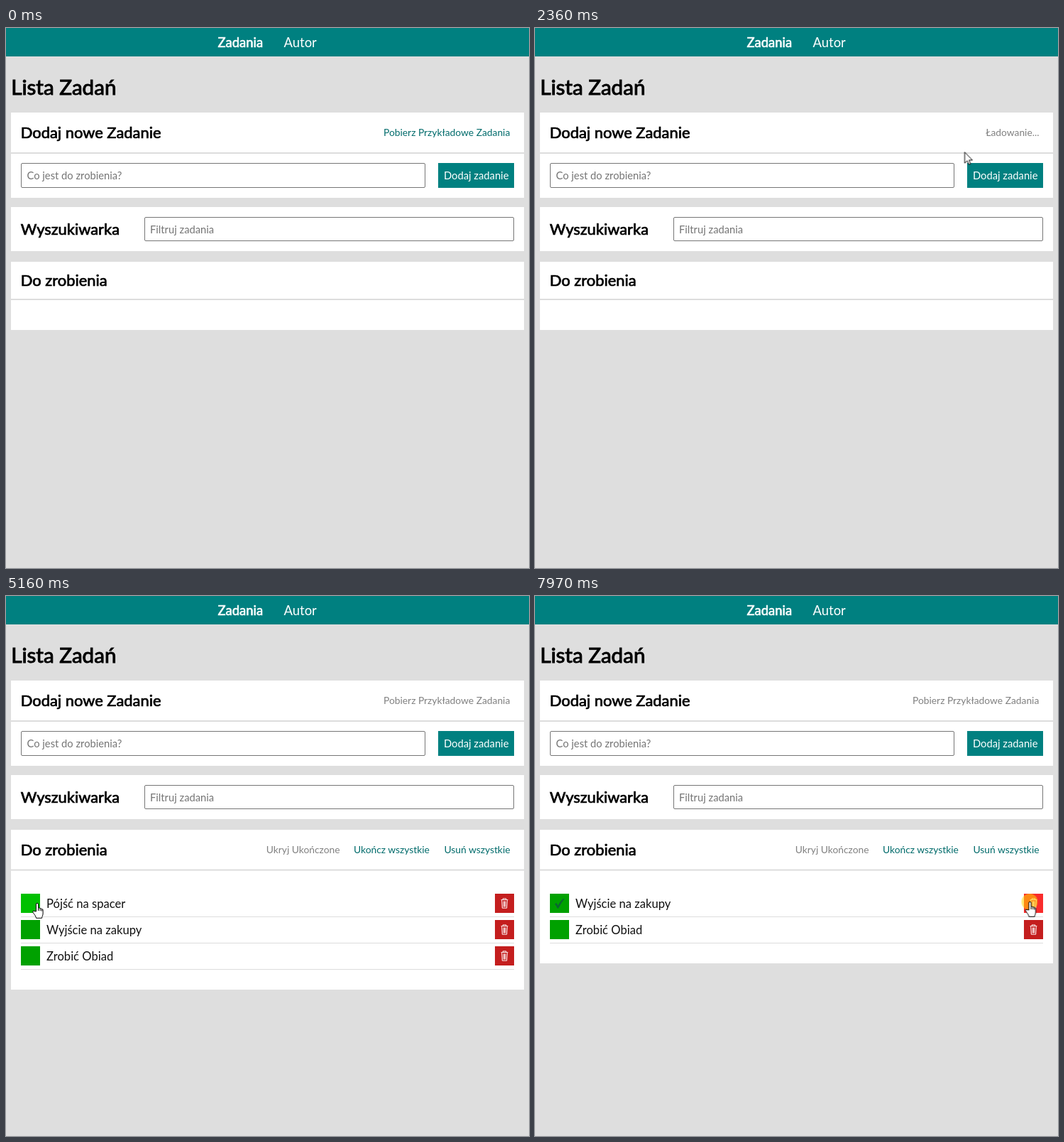
An HTML page for the animation above (8000 ms loop, 737 px wide and 760 px high).

```html
<!DOCTYPE html>
<html lang="pl">
<head>
<meta charset="utf-8">
<title>Lista Zadań</title>
<style>
html, body { margin: 0; width: 100%; height: 100%; overflow: hidden; background: #dedede; }
body { position: relative; color: #000; font: 14.74px Lato, sans-serif; }
body *, body svg { position: absolute; box-sizing: border-box; }
:root { --loop: 8s step-end infinite; }

/* text is placed by its left or right edge and its vertical centre */
.t { margin: -15px 0 0; line-height: 30px; white-space: nowrap; }
.bold { -webkit-text-stroke: .034em currentColor; }
h1, h2 { font-weight: 400; }
h1 { left: 7.2px; font-size: 29.6px; }
h2 { left: 20.8px; font-size: 21.9px; }
nav { width: 100%; height: 40px; background: #008080; color: #fff; font-size: 18.43px; }
.panel { left: 7px; width: 723px; background: #fff; }
.line { left: 7px; width: 723px; height: 2px; background: #ddd; }
.input { border: 1px solid #767676; border-radius: 2px; background: #fff; }
.hint { color: #757575; }
.button { left: 609px; top: 190px; width: 107px; height: 35px; background: #008080; color: #fff; }
.link { font-size: 13.82px; color: #006b6b; }
.off { color: #808080; }

/* page states */
.todo { animation: grow var(--loop); }
.shift { animation: shift var(--loop); }
.rule { animation: rule var(--loop); }
.get { animation: get var(--loop); }
.loading { animation: loading var(--loop); }
.list { left: 0; top: 0; animation: listed var(--loop); }
.search { animation: search var(--loop); }
.hide { animation: hide var(--loop); }
.finish { animation: finish var(--loop); }
@keyframes grow { 0% { height: 96px } 43.25% { height: 225px } 88.625%, 100% { height: 188px } }
@keyframes shift { 0% { transform: none } 43.25%, 100% { transform: translateY(1.7px) } }
@keyframes rule { 0% { transform: none } 43.25%, 100% { transform: translateY(3.6px) } }
@keyframes get {
  0% { color: #006b6b; transform: none; opacity: 1 }
  15.75% { color: #2f9090; transform: scale(1.02); opacity: 1 }
  24.375% { color: #808080; transform: none; opacity: 0 }
  43.25%, 100% { color: #808080; transform: none; opacity: 1 }
}
@keyframes loading { 0% { opacity: 0 } 24.375% { opacity: 1 } 43.25%, 100% { opacity: 0 } }
@keyframes listed { 0% { opacity: 0 } 43.25%, 100% { opacity: 1 } }
@keyframes search {
  0% { border-color: #767676 } 10.5% { border-color: #333 } 11.2% { border-color: #767676 }
  37.5% { border-color: #333 } 48.9%, 100% { border-color: #767676 }
}
@keyframes hide { 0% { color: #808080 } 68% { color: #006b6b } 88.625%, 100% { color: #808080 } }
@keyframes finish {
  0% { color: #006b6b; transform: none } 55.25% { color: #2f9090; transform: scale(1.02) }
  57.5%, 100% { color: #006b6b; transform: none }
}

/* tasks */
.row { left: 21px; width: 695px; height: 33px; border-bottom: 1px solid #ddd; font-size: 16.58px; }
.row .t { left: 36px; top: 13.5px; color: #111; }
.box { left: 0; top: 0; width: 27px; height: 27px; background: #00a100; }
.bin { left: 668px; top: 0; width: 27px; height: 27px; background: #c41e1e; }
.box svg, .bin svg { left: 0; top: 0; width: 27px; height: 27px; }
.first { animation: gone var(--loop); }
.first .box { animation: boxHover var(--loop); }
.first .bin { animation: binHover var(--loop); }
.first svg.tick { animation: tick 8s linear infinite; }
.strike { left: 36px; top: 14px; width: 108px; height: 1px; background: #111; animation: strike var(--loop); }
.next { animation: rise var(--loop); }
.second .bin { animation: nextHover var(--loop); }
.second svg.tick { animation: dim 8s linear infinite; }
@keyframes gone { 0% { opacity: 1 } 88.625%, 100% { opacity: 0 } }
@keyframes rise { 0% { transform: none } 88.625%, 100% { transform: translateY(-37px) } }
@keyframes boxHover { 0% { background: #00a100 } 63.75% { background: #00c000 } 70.7%, 100% { background: #00a100 } }
@keyframes binHover { 0% { background: #c41e1e } 81.3%, 100% { background: #f92c2c } }
@keyframes nextHover { 0% { background: #c41e1e } 88.625%, 100% { background: #f92c2c } }
@keyframes tick { 0%, 68% { opacity: 0 } 74%, 100% { opacity: 1 } }
@keyframes strike { 0% { opacity: 0 } 68%, 100% { opacity: 1 } }
@keyframes dim {
  0%, 88.6% { opacity: 0; color: #fff } 88.625% { opacity: 1; color: #fff }
  92%, 100% { opacity: 1; color: #0b6632 }
}

/* pointer */
.pointer { left: 0; top: 0; width: 0; height: 0; animation: move 8s linear infinite, enter var(--loop); }
.pointer svg { left: 0; top: 0; width: 1px; height: 1px; overflow: visible; }
.ring { left: -12px; top: -11px; width: 23px; height: 23px; border-radius: 50%; background: #ffd700; animation: ring var(--loop); }
.arrow { animation: arrow var(--loop); }
.hand { animation: hand var(--loop); }
.beam { animation: beam var(--loop); }
@keyframes enter { 0% { opacity: 0 } 5.375%, 100% { opacity: 1 } }
@keyframes move {
  0%, 5.375% { transform: translate(590px, 738px) }
  8.75% { transform: translate(596px, 420px) }
  10.75% { transform: translate(600px, 283px) }
  12.5% { transform: translate(605px, 205px) }
  15% { transform: translate(611px, 128px) }
  16.625%, 24.375% { transform: translate(614px, 145px) }
  26.25% { transform: translate(611px, 152px) }
  33.875% { transform: translate(598px, 204px) }
  38.75%, 47.375% { transform: translate(579px, 290.5px) }
  55% { transform: translate(561px, 343px) }
  56.75% { transform: translate(550px, 371px) }
  57.5% { transform: translate(534px, 378px) }
  63.75% { transform: translate(48px, 431px) }
  64.5%, 70.625% { transform: translate(44px, 432px) }
  76% { transform: translate(456px, 434px) }
  80.75% { transform: translate(679px, 432px) }
  82% { transform: translate(700px, 436px) }
  86%, 100% { transform: translate(697.5px, 430px) }
}
@keyframes ring {
  0% { opacity: 0 } 21% { opacity: .55 } 24.375% { opacity: 0 }
  66.25% { opacity: .55 } 69.75% { opacity: 0 }
  86.875% { opacity: .55 } 90.375% { opacity: 0 }
  99.6%, 100% { opacity: .55 }
}
@keyframes arrow {
  0% { opacity: 1 } 10.5% { opacity: 0 } 11.2% { opacity: 1 }
  15.75% { opacity: 0 } 24.375% { opacity: 1 }
  37.5% { opacity: 0 } 48.9% { opacity: 1 }
  55.25% { opacity: 0 } 57.5% { opacity: 1 }
  63.75% { opacity: 0 } 70.7% { opacity: 1 } 81.3%, 100% { opacity: 0 }
}
@keyframes hand {
  0% { opacity: 0 } 15.75% { opacity: 1 } 24.375% { opacity: 0 }
  55.25% { opacity: 1 } 57.5% { opacity: 0 }
  63.75% { opacity: 1 } 70.7% { opacity: 0 } 81.3%, 100% { opacity: 1 }
}
@keyframes beam {
  0% { opacity: 0 } 10.5% { opacity: 1 } 11.2% { opacity: 0 }
  37.5% { opacity: 1 } 48.9%, 100% { opacity: 0 }
}
</style>
</head>
<body>
<svg width="0" height="0">
  <symbol id="bin" viewBox="0 0 27 27">
    <path d="M8.6 8.6H18.4M11.2 8.2V6.9H15.8V8.2M9.6 9.2L10.3 20.2H16.7L17.4 9.2M12 10.5V18.6M13.5 10.5V18.6M15 10.5V18.6" fill="none" stroke="#fff" stroke-width=".95"/>
  </symbol>
  <symbol id="tick" viewBox="0 0 27 27">
    <path d="M6.8 14.6L9.3 12.9Q10.6 14.6 11.3 16.4Q14.2 10.6 18.8 6.7L20.4 7.4Q15.6 12.7 12.3 20.3L10.6 20.7Q9.2 17.2 6.8 14.6Z" fill="currentColor"/>
  </symbol>
</svg>

<nav>
  <span class="t bold" style="left:298.6px;top:20px">Zadania</span>
  <span class="t" style="left:391.6px;top:20px">Autor</span>
</nav>
<h1 class="t bold" style="top:83px">Lista Zadań</h1>

<div class="panel" style="top:119px;height:119.5px"></div>
<div class="line" style="top:174.5px"></div>
<h2 class="t bold" style="top:147px">Dodaj nowe Zadanie</h2>
<span class="t link get" style="right:26.5px;top:147px">Pobierz Przykładowe Zadania</span>
<span class="t link off loading" style="right:26.5px;top:147px">Ładowanie...</span>
<div class="input" style="left:21px;top:190px;width:570px;height:35px"></div>
<span class="t hint" style="left:29.5px;top:207px">Co jest do zrobienia?</span>
<div class="button"></div>
<span class="t" style="left:617px;top:207px;color:#fff">Dodaj zadanie</span>

<div class="panel" style="top:252px;height:61.5px"></div>
<h2 class="t bold" style="top:283px">Wyszukiwarka</h2>
<div class="input search" style="left:195px;top:265.5px;width:521px;height:34.5px"></div>
<span class="t hint" style="left:203px;top:283px">Filtruj zadania</span>

<div class="panel todo" style="top:329px"></div>
<div class="line rule" style="top:381px"></div>
<h2 class="t bold shift" style="top:355px">Do zrobienia</h2>
<div class="list" style="width:737px">
  <span class="t link hide" style="right:266.5px;top:356.5px">Ukryj Ukończone</span>
  <span class="t link finish" style="right:140px;top:356.5px">Ukończ wszystkie</span>
  <span class="t link" style="right:26.5px;top:356.5px">Usuń wszystkie</span>
  <div class="row first" style="top:419px">
    <div class="box"><svg class="tick" color="#fff"><use href="#tick"/></svg></div>
    <span class="t">Pójść na spacer</span><i class="strike"></i>
    <div class="bin"><svg><use href="#bin"/></svg></div>
  </div>
  <div class="row next second" style="top:456px">
    <div class="box"><svg class="tick"><use href="#tick"/></svg></div>
    <span class="t">Wyjście na zakupy</span>
    <div class="bin"><svg><use href="#bin"/></svg></div>
  </div>
  <div class="row next" style="top:493px">
    <div class="box"></div>
    <span class="t">Zrobić Obiad</span>
    <div class="bin"><svg><use href="#bin"/></svg></div>
  </div>
</div>

<div class="pointer">
  <div class="ring"></div>
  <svg class="arrow"><path d="M0 .5V16L3.6 12.7L6 18L8.4 17L6.1 11.8H11Z" fill="#fff" stroke="#000"/></svg>
  <svg class="hand" fill="#fff" stroke="#000" stroke-linejoin="round">
    <path d="M-1.6 12V2a1.6 1.6 0 0 1 3.2 0V7.6a1.4 1.4 0 0 1 2.5 .5a1.3 1.3 0 0 1 2.3 .7a1.2 1.2 0 0 1 1.7 1.2V15c0 3-1.5 3.8-1.5 6.3H-1.5C-1.8 18.5-4 16.5-6 13.2c-.9-1.6.6-2.7 2-1.6Z"/>
    <path d="M1.6 7.6V11M4.1 8.1V11.2M6.4 8.8V11.5" fill="none"/>
  </svg>
  <svg class="beam"><path d="M-3-7H-1L0-6L1-7H3M0-6V6M-3 7H-1L0 6L1 7H3" fill="none" stroke="#000"/></svg>
</div>
</body>
</html>
```
